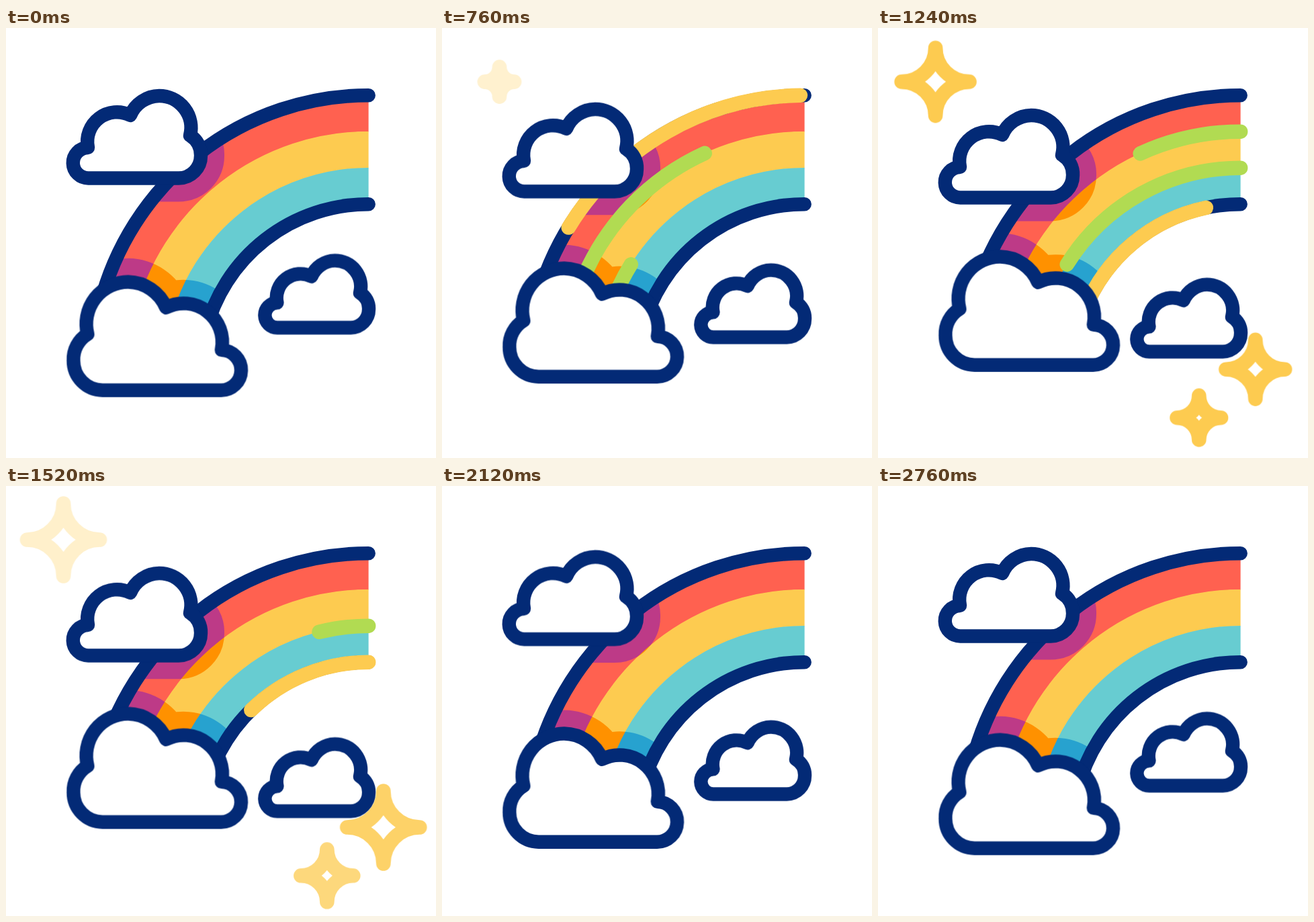
Animation of 640x640 px, one loop 3 s. Source, as an HTML page:

```html
<!DOCTYPE html>
<html lang="en">
<head>
<meta charset="utf-8">
<title>Rainbow</title>
<style>
  @property --tip { syntax: "<length>"; inherits: false; initial-value: -5px; }
  @property --tail { syntax: "<length>"; inherits: false; initial-value: -5px; }
  @property --k { syntax: "<number>"; inherits: false; initial-value: 1; }

  html, body { margin: 0; width: 100%; height: 100%; overflow: hidden; background: #fff; }
  svg { display: block; width: 640px; height: 640px; fill: none; stroke-linejoin: round; }

  .red { stroke: #ff6150; }
  .yellow { stroke: #fdcb50; }
  .teal { stroke: #67ccd1; }
  .green { stroke: #b1db52; }
  .purple { stroke: #bd3a87; }
  .orange { stroke: #ff9100; }
  .blue { stroke: #27a2cf; }
  .band { stroke-width: 54.6px; }
  .edge { stroke: #032a76; stroke-width: 20.6px; stroke-linecap: round; }

  .cloud { fill: #fff; stroke: #032a76; stroke-width: calc(20.4px / var(--s)); }
  .shade { fill: #fff; stroke: #fff; stroke-width: calc(70px / var(--s)); }
  .bob { animation: bob 3s var(--wait) infinite cubic-bezier(.4, 0, .25, 1); }
  .left { --dy: 29.4px; --wait: 217ms; }
  .front { --dy: -39px; --wait: 310ms; }
  .right { --dy: 38px; --wait: 380ms; }
  @keyframes bob {
    0%, 80%, 100% { transform: translateY(0); }
    40% { transform: translateY(var(--dy)); }
  }

  /* A light streak: its head leaves first, its tail follows. */
  .streak {
    stroke-width: 21.6px;
    stroke-linecap: round;
    stroke-dasharray: max(0px, var(--tip) - var(--tail)) 400px;
    stroke-dashoffset: calc(-1 * var(--tail));
    animation: tip 3s var(--in) infinite, tail 3s var(--out) infinite;
    animation-timing-function: cubic-bezier(.333, 0, .667, 1);
  }
  @keyframes tip {
    0% { --tip: 0px; }
    20%, 50% { --tip: 100px; }
    50.01%, 100% { --tip: -5px; }
  }
  @keyframes tail {
    0% { --tail: 0px; }
    20% { --tail: 100px; }
    20.01%, 50% { --tail: 105px; }
    50.01%, 100% { --tail: -5px; }
  }

  .spark {
    opacity: 0;
    stroke-width: calc(21.6px / var(--k));
    transform: scale(var(--k));
    animation: grow 3s var(--wait) infinite cubic-bezier(.333, 0, .667, 1),
               glow 3s var(--wait) infinite linear;
  }
  @keyframes grow {
    0% { --k: calc(.395 * var(--max)); }
    22.67%, 100% { --k: var(--max); }
  }
  @keyframes glow {
    0%, 29.33%, 100% { opacity: 0; }
    7.4%, 22.67% { opacity: 1; }
  }
</style>
</head>
<body>
<svg viewBox="0 0 640 640">
  <defs>
    <path id="cloud" d="M123 223.5A22.75 22.75 0 0 1 122 178A44 44 0 0 1 185 130A47.5 47.5 0 0 1 228 101A47.5 47.5 0 0 1 274 160A33.3 33.3 0 0 1 290 190A33.3 33.3 0 0 1 257 223.5Z"/>
    <path id="star" d="M0-54A54 54 0 0 0 54 0A54 54 0 0 0 0 54A54 54 0 0 0-54 0A54 54 0 0 0 0-54Z"/>
    <path id="outer" d="M166 419.1A385 385 0 0 1 539.6 127.2"/>
    <path id="middle" d="M218.4 432.1A331 331 0 0 1 539.6 181.2"/>
    <path id="inner" d="M270.8 445.2A277 277 0 0 1 539.6 235.2"/>
    <mask id="shadow" maskUnits="userSpaceOnUse" x="0" y="0" width="640" height="640">
      <g class="bob left"><use href="#cloud" class="shade" style="--s: 1"/></g>
      <g class="bob front"><use href="#cloud" class="shade" style="--s: 1.314" transform="matrix(-1.312 0 0 1.316 480.9 245)"/></g>
    </mask>
  </defs>

  <g class="band">
    <use href="#outer" class="red"/>
    <use href="#middle" class="yellow"/>
    <use href="#inner" class="teal"/>
  </g>
  <g class="band" mask="url(#shadow)">
    <use href="#outer" class="purple"/>
    <use href="#middle" class="orange"/>
    <use href="#inner" class="blue"/>
  </g>

  <path class="edge" d="M139.8 412.5A412 412 0 0 1 539.6 100.2"/>
  <path class="edge" d="M297 451.7A250 250 0 0 1 539.6 262.2"/>

  <path class="streak yellow" pathLength="100" style="--in: 200ms; --out: 595ms" d="M147.8 384.9A412 412 0 0 1 539.6 100.2"/>
  <path class="streak green" pathLength="100" style="--in: 404ms; --out: 885ms" d="M207.2 379.2A358 358 0 0 1 539.6 154.2"/>
  <path class="streak green" pathLength="100" style="--in: 616ms; --out: 1096ms" d="M257.3 399.3A304 304 0 0 1 539.6 208.2"/>
  <path class="streak yellow" pathLength="100" style="--in: 800ms; --out: 1282ms" d="M307.5 419.4A250 250 0 0 1 539.6 262.2"/>

  <g class="bob left"><use href="#cloud" class="cloud" style="--s: 1"/></g>
  <g class="bob front"><use href="#cloud" class="cloud" style="--s: 1.314" transform="matrix(-1.312 0 0 1.316 480.9 245)"/></g>
  <g class="bob right"><use href="#cloud" class="cloud" style="--s: .814" transform="matrix(.813 0 0 .815 304.2 263.8)"/></g>

  <g class="yellow">
    <g transform="translate(85.5 80)"><use href="#star" class="spark" style="--max: 1; --wait: 700ms"/></g>
    <g transform="translate(561.7 508)"><use href="#star" class="spark" style="--max: 1; --wait: 813ms"/></g>
    <g transform="translate(477.8 580)"><use href="#star" class="spark" style="--max: .722; --wait: 790ms"/></g>
  </g>
</svg>
</body>
</html>
```
